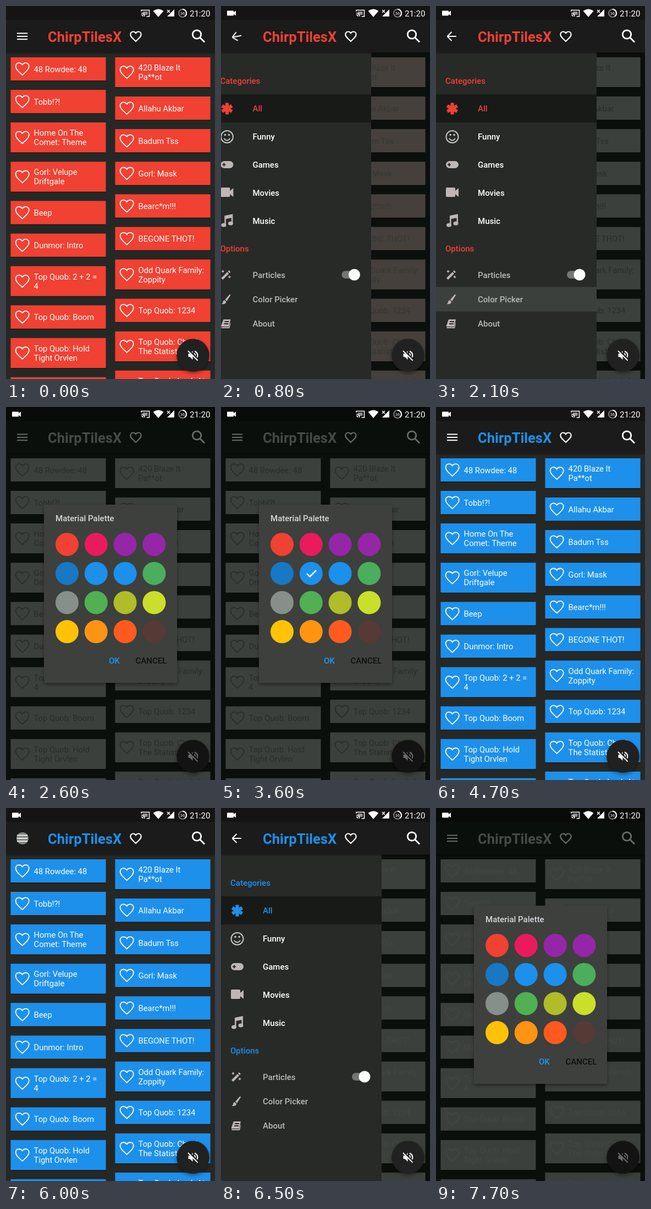
Recreate the animation shown at these times as an HTML page. Size 380 by 676 pixels, loop 8000 ms.

```html
<!DOCTYPE html>
<html lang="en">
<head>
<meta charset="utf-8">
<title>Sound board</title>
<style>
@property --accent { syntax: "<color>"; inherits: true; initial-value: #f04132; }
@property --card { syntax: "<color>"; inherits: true; initial-value: #f04132; }
@property --ink { syntax: "<color>"; inherits: true; initial-value: #fff; }
@property --page { syntax: "<color>"; inherits: true; initial-value: #262826; }
@property --bar { syntax: "<color>"; inherits: true; initial-value: #1a1b1a; }
@property --bar-ink { syntax: "<color>"; inherits: true; initial-value: #fff; }
@property --title { syntax: "<color>"; inherits: true; initial-value: #f04132; }

:root {
  --red: #f04132; --blue: #1d90ec; --grey: #3c403c;
  --loop: 8s linear infinite;
  --slide: 8s cubic-bezier(.25, .8, .4, 1) infinite;
}
html, body { margin: 0; width: 100%; height: 100%; overflow: hidden; background: #0b0e0b; }
#stage {
  display: block; width: 380px; height: 676px;
  font: 14.75px Roboto, sans-serif;
  animation: accent var(--loop), list var(--slide), bar var(--loop);
}
.card { fill: var(--card); }
.ink { fill: var(--ink); }
.page { fill: var(--page); }
.bar { fill: var(--bar); }
.title { fill: var(--title); font-weight: 700; font-size: 25.6px; }
.accent { fill: var(--accent); }
.medium { font-weight: 500; font-size: 15px; }
.line { fill: none; stroke-width: 2; }
.ink-line { stroke: var(--ink); }
.bar-line { stroke: var(--bar-ink); }

#app { transform-origin: 190px 338px; animation: restart var(--loop); }
#camera { animation: camera 8s step-end infinite; }
#drawer { animation: drawer var(--slide); }
#pressed { animation: pressed var(--loop); }
#menu { transform-origin: 29.5px 55px; animation: spin var(--slide), morph var(--slide); }
#dialog { transform-origin: 190px 338px; animation: dialog var(--loop); }
#check { transform-origin: 164px 301.5px; animation: check var(--loop); }
#touch { animation: touch 8s step-end infinite; }

@keyframes accent {
  0%, 53.75% { --accent: var(--red); }
  58%, 100% { --accent: var(--blue); }
}
@keyframes list {
  0%, 7% { --card: var(--red); --ink: #fff; --page: #262826; }
  12%, 51.25% { --card: var(--grey); --ink: #2a2d2a; --page: #0b0f0b; }
  52.5%, 53.75% { --card: var(--red); --ink: #fff; --page: #262826; }
  58%, 75.5% { --card: var(--blue); --ink: #fff; --page: #262826; }
  81%, 100% { --card: var(--grey); --ink: #434643; --page: #0b0f0b; }
}
@keyframes bar {
  0%, 28.75% { --bar: #1a1b1a; --bar-ink: #fff; --title: var(--red); }
  31.25%, 51.25% { --bar: #0b0f0b; --bar-ink: #696c69; --title: #464946; }
  52.5%, 53.75% { --bar: #1a1b1a; --bar-ink: #fff; --title: var(--red); }
  58%, 93.75% { --bar: #1a1b1a; --bar-ink: #fff; --title: var(--blue); }
  96.25%, 100% { --bar: #0b0f0b; --bar-ink: #696c69; --title: #464946; }
}
@keyframes restart {
  0%, 51.25%, 56.25%, 100% { transform: none; }
  52.5%, 53.75% { transform: scale(.997); }
}
@keyframes camera { 0% { opacity: 0; } 1.25%, 100% { opacity: 1; } }
@keyframes drawer {
  0%, 7%, 31.25%, 75.5%, 96.25%, 100% { transform: translateX(-300px); }
  12.25%, 27.5%, 81%, 92.5% { transform: none; }
}
@keyframes pressed {
  0%, 22%, 31.25%, 87%, 96.25%, 100% { opacity: 0; }
  25%, 30.5%, 90%, 95.5% { opacity: 1; }
}
@keyframes spin {
  0%, 7%, 31.25%, 75.5%, 96.25%, 100% { transform: none; }
  12.25%, 27.5%, 81%, 92.5% { transform: rotate(180deg); }
}
@keyframes morph {
  0%, 7%, 31.25%, 75.5%, 96.25%, 100% { d: path("M20 49.6L39.2 49.6M20 55L39.2 55M20 60.3L39.2 60.3"); }
  12.25%, 27.5%, 81%, 92.5% { d: path("M30.5 47L38.5 55M22 55L38 55M30.5 63L38.5 55"); }
}
@keyframes dialog {
  0%, 28.5%, 93.5% { opacity: 0; transform: scale(.92); }
  31.25%, 51.25%, 96.25%, 100% { opacity: 1; transform: none; }
  52.4% { opacity: 0; transform: none; }
}
@keyframes check {
  0%, 41.25%, 52.5%, 100% { transform: scale(0); }
  44%, 52.4% { transform: none; }
}
@keyframes touch {
  0%, 8.75%, 25%, 43.75%, 53.75%, 76.25%, 90%, 100% { opacity: 0; }
  6.25%, 73.75% { opacity: .55; transform: translate(30px, 55px); }
  21.25%, 86.25% { opacity: .55; transform: translate(150px, 532px); }
  40% { opacity: .55; transform: translate(164px, 302px); }
  51.25% { opacity: .55; transform: translate(202px, 460px); }
}
</style>
</head>
<body>
<svg id="stage" viewBox="0 0 380 676">
  <defs>
    <path id="heart" d="M12 20.200C6 14.800 3 12 3 8.500C3 5.900 5 4 7.500 4C9.300 4 11 5 12 6.500C13 5 14.700 4 16.500 4C19 4 21 5.900 21 8.500C21 12 18 14.800 12 20.200Z"/>
    <filter id="shadow" x="-20%" y="-20%" width="140%" height="150%">
      <feDropShadow dx="0" dy="3" stdDeviation="3" flood-opacity=".4"/>
    </filter>
  </defs>

  <g id="app">
    <rect class="page" width="380" height="676"/>
    <g id="cards"></g>

    <g id="drawer">
      <rect y="84" width="292" height="592" fill="#282a28"/>
      <rect y="160" width="292" height="51" fill="#181a18"/>
      <rect id="pressed" y="509" width="292" height="44.5" fill="#3c403c"/>
      <g class="medium" id="labels"></g>
      <g class="line" stroke="var(--accent)" style="stroke-width:6">
        <path d="M29.5 175.500V196.500M20.400 180.800L38.600 191.200M38.600 180.800L20.400 191.200"/>
      </g>
      <g class="line" stroke="#c4c4c4">
        <circle cx="29.500" cy="237" r="11"/>
        <path d="M24 240Q29.500 247 35 240"/>
        <path d="M26 233.500h.1M33 233.500h.1" stroke-width="3.500" stroke-linecap="round"/>
      </g>
      <g fill="#beb7b4">
        <rect x="18" y="281" width="23" height="13" rx="6.500"/>
        <path d="M18 331q0-2 2-2h13q2 0 2 2v4l6-5v16l-6-5v3q0 2-2 2H20q-2 0-2-2z"/>
        <path d="M25 380l15-3v17h-2.500v-10l-10 2v11H25z"/>
        <ellipse cx="23.500" cy="397" rx="4.500" ry="3.500"/>
        <ellipse cx="36" cy="394" rx="4.500" ry="3.500"/>
        <path d="M19 493l11-11 3 3-11 11zM31 481l2-2 3 3-2 2z"/>
        <path d="M22 478l1 2 2 1-2 1-1 2-1-2-2-1 2-1zM34 488l1 2 2 1-2 1-1 2-1-2-2-1 2-1z"/>
        <path d="M26 532l8-9q2-1 2 1l-7 11zM25 533l3 3q0 5-9 4 3-1 3-4 0-2 3-3z"/>
        <path d="M23 568h13l-3 13H20q-2 0-1-2zM19 582h14l3-9v3l-2 8H20z"/>
      </g>
      <path class="line" stroke="#282a28" d="M21 287.500h6M24 284.500v6M35 285v.1M37 289v.1M25 572h8M24 576h8"/>
      <rect x="238" y="480" width="30" height="14" rx="7" fill="#747674"/>
      <circle cx="261" cy="487" r="10.500" fill="#fff"/>
    </g>

    <rect y="84" width="380" height="3" opacity=".2"/>
    <rect class="bar" width="380" height="84.400"/>
    <rect width="380" height="25.300" opacity=".25"/>
    <path id="menu" class="line bar-line" d="M20 49.600L39.200 49.600M20 55L39.200 55M20 60.300L39.200 60.300"/>
    <text class="title" x="76" y="64.500">ChirpTilesX</text>
    <use href="#heart" class="line bar-line" transform="translate(223 42.200) scale(1.080)"/>
    <g class="line bar-line" style="stroke-width:2.8">
      <circle cx="347" cy="51.500" r="7.700"/>
      <path d="M352.500 57L361 65.500"/>
    </g>

    <g filter="url(#shadow)"><circle class="bar" cx="340" cy="633" r="29.700"/></g>
    <circle cx="340" cy="633" r="29.700" fill="#fff" opacity=".025"/>
    <g class="line bar-line">
      <path d="M331.500 630h3l5-5v16l-5-5h-3z" fill="var(--bar-ink)" stroke="none"/>
      <path d="M342.500 629q3 4 0 8M343 625.500q8 4 4 12" />
      <path d="M332 624.500l17 17" stroke="var(--bar)" stroke-width="4"/>
      <path d="M331 625l17.500 17.500"/>
    </g>
  </g>

  <g fill="#fff">
    <g id="camera"><rect x="11" y="8.500" width="12" height="9" rx="1"/><path d="M22 12l5-3.500v9L22 14z"/></g>
    <path class="line" stroke="#fff" style="stroke-width:1.500" d="M246 10V7.500h14.500v11.500h-5M246 13q6 0 6 6M246 16q3 0 3 3"/>
    <rect x="249" y="10" width="8.500" height="6" opacity=".55"/>
    <path d="M267.500 9q9.500-7 19 0L277 20z"/>
    <path d="M306 6v13h-13l6-6z"/>
    <path class="line" stroke="#fff" style="stroke-width:1.500" d="M293 7l5 5M298 7l-5 5"/>
    <circle class="line" cx="321" cy="13" r="7" stroke="#777"/>
    <path class="line" stroke="#fff" d="M321 6A7 7 0 0 1 325 18.700"/>
    <text x="321" y="15.700" font-size="7.500" text-anchor="middle">36</text>
    <text x="334" y="18.500" font-size="15">21:20</text>
  </g>

  <g id="dialog">
    <rect x="69" y="177" width="242" height="323" rx="2" fill="#3e413e" filter="url(#shadow)"/>
    <g class="medium">
      <text x="90" y="207" fill="#d3d7d9">Material Palette</text>
      <text x="187" y="465" fill="#2196f3">OK</text>
      <text x="235.500" y="465" fill="#0d100d">CANCEL</text>
    </g>
    <g id="swatches"></g>
    <path id="check" class="line" stroke="#fff" style="stroke-width:2.500" d="M156 302l5.500 5.500L173 296"/>
  </g>
  <circle id="touch" r="11" fill="#d8dcd8"/>
</svg>

<script>
const columns = [
  ["48 Rowdee: 48", "Tobb!?!", "Home On The|Comet: Theme", "Gorl: Velupe|Driftgale", "Beep",
   "Dunmor: Intro", "Top Quob: 2 + 2 =|4", "Top Quob: Boom", "Top Quob: Hold|Tight Orvlen", "Top Quob: Man's|Hot"],
  ["420 Blaze It|Pa**ot", "Allahu Akbar", "Badum Tss", "Gorl: Mask", "Bearc*m!!!",
   "BEGONE THOT!", "Odd Quark Family:|Zoppity", "Top Quob: 1234", "Top Quob: Check|The Statistics", "Top Quob: Look At|Now"]
];
const swatches = [
  "#f04132", "#eb1a5d", "#9626a8", "#9626a8",
  "#1878c4", "#1b90ec", "#1b90ec", "#4aae5c",
  "#868f89", "#50b052", "#b0bc28", "#cadf2a",
  "#ffc207", "#ff9412", "#ff5a1e", "#563a35"
];
const fill = (id, markup) => document.getElementById(id).innerHTML = markup;

const cardWidth = 173.2, cardGap = 16.9;

function drawCard(lines, x, y, height) {
  const middle = y + height / 2;
  const first = middle + 5.6 - 8.5 * (lines.length - 1);
  const text = lines.map((line, i) =>
    `<text class="ink" x="${x + 42.2}" y="${first + 17 * i}">${line}</text>`).join("");
  return `<rect x="${x}" y="${y + 1.5}" width="${cardWidth}" height="${height}" rx=".7" opacity=".35"/>
    <rect class="card" x="${x}" y="${y}" width="${cardWidth}" height="${height}" rx=".7"/>
    <use href="#heart" class="line ink-line" style="stroke-width:1.3"
      transform="translate(${x + 5.1} ${middle - 16.2}) scale(1.35)"/>${text}`;
}

fill("cards", columns.map((labels, column) => {
  let y = 92.9;
  return labels.map(label => {
    const lines = label.split("|");
    const height = 30.2 + 12 * lines.length;
    const card = drawCard(lines, 8.4 + 190 * column, y, height);
    y += height + cardGap;
    return card;
  }).join("");
}).join(""));

const label = (text, x, middle, style) => `<text x="${x}" y="${middle + 5}" ${style}>${text}</text>`;
const accent = 'class="accent"';
fill("labels",
  label("Categories", 17, 136, accent) + label("Options", 17, 440, accent) +
  ["All", "Funny", "Games", "Movies", "Music"].map((text, i) =>
    label(text, 76, 186.3 + 50.8 * i, i ? 'fill="#fff"' : accent)).join("") +
  ["Particles", "Color Picker", "About"].map((text, i) =>
    label(text, 76, 487.5 + 44.4 * i, 'fill="#b9bbb9"')).join(""));

fill("swatches", swatches.map((color, i) => {
  const x = 111 + 52.8 * (i % 4), y = 249 + 52.7 * Math.floor(i / 4);
  return `<circle cx="${x}" cy="${y}" r="21" fill="${color}"/>`;
}).join(""));
</script>
</body>
</html>
```
